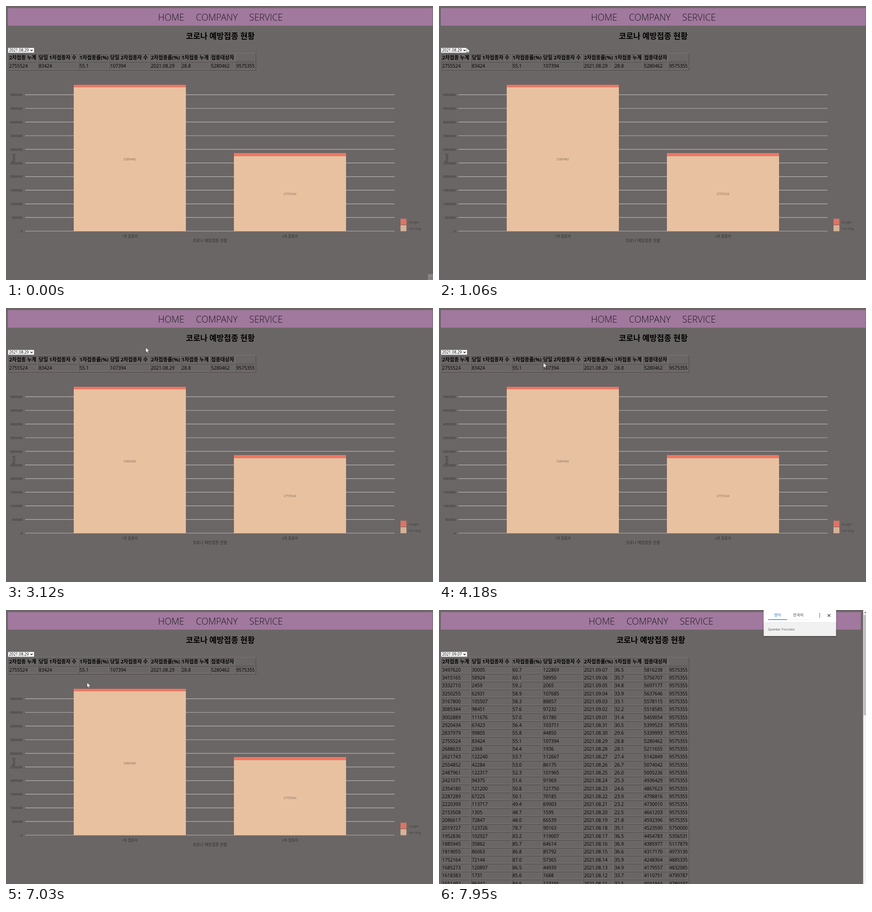
An HTML page that plays this animation: 933 px wide and 600 px high, repeating every 8 s.

```html
<!DOCTYPE html>
<html lang="ko">
<head>
<meta charset="utf-8">
<title>코로나 예방접종 현황</title>
<style>
html, body { margin: 0; width: 100%; height: 100%; overflow: hidden; background: #6b6666; }
svg { display: block; width: 933px; height: 600px; font-family: "Open Sans", "Noto Sans CJK KR", sans-serif; }
.nav { font-weight: 300; }
.flip { visibility: hidden; animation: 8s step-end infinite; }
#status { animation-name: status; }
#chartPage { animation-name: chartPage; }
#listPage { animation-name: listPage; }
#beam { animation-name: beam; }
#popup { opacity: 0; animation: popup 8s linear infinite; }
#arrow { animation: arrow 8s ease-in-out infinite; }
@keyframes status { 0% { visibility: visible } .875%, 100% { visibility: hidden } }
@keyframes chartPage { 0% { visibility: visible } 92%, 100% { visibility: hidden } }
@keyframes listPage { 0% { visibility: hidden } 92%, 100% { visibility: visible } }
@keyframes beam { 0% { visibility: hidden } 94.5%, 100% { visibility: visible } }
@keyframes popup { 0%, 93.6% { opacity: 0 } 96%, 100% { opacity: 1 } }
@keyframes arrow {
  0%, 4.99% { transform: translate(950px, 620px) }
  5% { transform: translate(867px, 590px); animation-timing-function: ease-out }
  13.25% { transform: translate(60.5px, 91.5px) }
  16.5%, 22.3% { transform: translate(42px, 95px) }
  27.4% { transform: translate(103px, 9px) }
  32.4%, 33% { transform: translate(317px, 52px) }
  42.4%, 43.2% { transform: translate(301px, 99px) }
  46.5%, 48.2% { transform: translate(301px, 105px); animation-timing-function: ease-out }
  52.2% { transform: translate(228px, 119.5px) }
  54.75%, 57.2% { transform: translate(226px, 124.5px) }
  62.25%, 73.8% { transform: translate(185px, 161px) }
  81.25%, 86.1% { transform: translate(179px, 159px) }
  87.9%, 94.49% { transform: translate(177px, 158.5px) }
  94.5%, 100% { transform: translate(950px, 620px) }
}
</style>
</head>
<body>
<svg id="stage" viewBox="0 0 933 600">
  <defs>
    <filter id="shadow" x="-10%" y="-10%" width="120%" height="130%">
      <feDropShadow dx="0" dy="1" stdDeviation="1.5" flood-opacity=".45"/>
    </filter>
  </defs>
  <g id="chartPage" class="flip"></g>
  <g id="listPage" class="flip"></g>
  <g id="status" class="flip"></g>
  <g id="popup"></g>
  <g id="beam" class="flip">
    <path d="M174.8 155h4M176.8 155v10M174.8 165h4" fill="none" stroke="#938e8e" stroke-width=".7"/>
  </g>
  <path id="arrow" d="M0 0V11.3L2.6 8.9L4.2 12.6L6 11.9L4.4 8.2H8Z" fill="#fff" stroke="#111" stroke-width=".6"/>
</svg>
<script>
const SVG = 'http://www.w3.org/2000/svg';
const INK = '#353131';
const PITCH = 52 / 3;
const middle = { 'text-anchor': 'middle' };
const byId = id => document.getElementById(id);

function add(parent, tag, attrs, content) {
  const node = document.createElementNS(SVG, tag);
  for (const key in attrs) node.setAttribute(key, attrs[key]);
  if (content !== undefined) node.textContent = content;
  parent.appendChild(node);
  return node;
}
const rect = (g, x, y, width, height, fill, more) => add(g, 'rect', { x, y, width, height, fill, ...more });
const path = (g, d, stroke, width) => add(g, 'path', { d, fill: 'none', stroke, 'stroke-width': width });
const text = (g, x, y, size, content, more) => add(g, 'text', { x, y, 'font-size': size, ...more }, content);

function bevel(g, x, y, w, h, topLeft, bottomRight) {
  path(g, `M${x} ${y + h}V${y}H${x + w}`, topLeft, .75);
  path(g, `M${x} ${y + h}H${x + w}V${y}`, bottomRight, .75);
}

function header(g, right, date) {
  const mid = (4 + right) / 2;
  rect(g, 4, 4.6, right - 4, 38.4, '#a1789e');
  [['HOME', -107.3], ['COMPANY', -7.5], ['SERVICE', 100]].forEach(([word, dx]) =>
    text(g, mid + dx, 32, 19.8, word, { ...middle, class: 'nav', fill: '#1c1a1c' }));
  text(g, mid, 72.3, 17.1, '코로나 예방접종 현황', { ...middle, 'font-weight': 700 });
  rect(g, 4.3, 91.7, 57.2, 10.8, '#fff', { stroke: '#777', 'stroke-width': .7 });
  text(g, 6.8, 100.2, 8.45, date);
  path(g, 'M53.6 95.8l2.3 2.4 2.3-2.4', '#111', 1.3);
}

const columns = [7.3, 72, 161, 228, 317, 384, 448.5, 503.5, 546.7];
const titles = ['2차접종 누계', '당일 1차접종자 수', '1차접종률(%)', '당일 2차접종자 수', '2차접종률(%)', '1차접종 누계', '접종대상자'];

function table(g, rows) {
  bevel(g, 4.4, 103.6, 541.6, (rows.length + 1) * PITCH + 2.4, '#837e7e', '#453f3f');
  [titles, ...rows].forEach((cells, r) => {
    const y = 105.5 + r * PITCH;
    cells.forEach((cell, c) => {
      const x = columns[c] - 1.2;
      bevel(g, x, y, columns[c + 1] - columns[c] - 1.9, 15.7, '#453f3f', '#837e7e');
      text(g, columns[c] - .3, y + 11.9, r ? 10.1 : 10.9, cell, { 'font-weight': r ? 400 : 700 });
    });
  });
}

const DAYS = 28;
const picked = { day: 9, first: 83424, second: 107394 };
const mix = (a, b, t) => Math.round(a + (b - a) * t);

// Running total through its newest, picked and oldest values
const total = (day, newest, chosen, oldest) => day < picked.day
  ? mix(newest, chosen, day / picked.day)
  : mix(chosen, oldest, (day - picked.day) / (DAYS - 1 - picked.day));

let seed = 7;
const random = () => (seed = seed * 16807 % 2147483647) / 2147483647;
const shots = (day, low, high) => day % 8 === 2 ? mix(1000, 3000, random()) : mix(low, high, random());

function record(day) {
  const people = day < 20 ? 9575355 : Math.round(4.75e6 + 1e6 * Math.exp((20 - day) / 2));
  const first = total(day, 5816238, 5280462, 4041944);
  const second = total(day, 3497620, 2755524, 1551492);
  const today = day === picked.day ? picked
    : { first: shots(day, 30000, 130000), second: shots(day, 40000, 130000) };
  const percent = n => (100 * n / people).toFixed(1);
  const date = new Date(Date.UTC(2021, 8, 7 - day)).toISOString().slice(0, 10).replaceAll('-', '.');
  return [second, today.first, percent(first), today.second, date, percent(second), first, people];
}
const rows = Array.from({ length: DAYS }, (_, day) => record(day));

function chart(g, row) {
  const base = 493;
  const scale = n => n * 298.6 / 5e6;
  for (let n = 0; n <= 5e6; n += 5e5) {
    const y = base - scale(n);
    path(g, `M42 ${y}H849`, '#b9b6b6', 1.2);
    text(g, 36.3, y + 2.8, 6.9, n, { 'text-anchor': 'end', fill: INK });
  }
  [[148, row[6], row[1], '1차 접종자'], [498, row[0], row[3], '2차 접종자']].forEach(([x, sum, today, label]) => {
    const h = scale(sum), top = scale(today);
    rect(g, x, base - h, 245, h, '#e8c1a0');
    rect(g, x, base - h - top, 245, top, '#f47560');
    text(g, x + 122.5, base - h / 2 + 2.8, 6.9, sum, { ...middle, fill: '#836d5a' });
    text(g, x + 122.5, 507.3, 7.8, label, { ...middle, fill: INK });
  });
  text(g, 445.5, 516.5, 8.6, '코로나 예방접종 현황', { ...middle, fill: INK });
  text(g, 0, 0, 8.3, 'food', { ...middle, fill: INK, transform: 'translate(20 333) rotate(-90)' });
  [['burger', '#df7361', 465.8], ['hot dog', '#d5b397', 480]].forEach(([name, color, y]) => {
    rect(g, 862, y, 12.9, 13.2, color);
    text(g, 880, y + 9.8, 7.3, name, { fill: '#454040' });
  });
}

const first = byId('chartPage');
header(first, 932.3, '2021.08.29');
table(first, [rows[picked.day]]);
chart(first, rows[picked.day]);

const list = byId('listPage');
header(list, 921.7, '2021.09.07');
table(list, rows);
rect(list, 926.8, 0, 6.2, 600, '#f4f3f3');
rect(list, 927.8, 10.5, 5.2, 220, '#c1c0c0');
add(list, 'path', { d: 'M929 6.5l2.4-2.6 2.4 2.6z', fill: '#555' });

const status = byId('status');
rect(status, 922, 587.3, 11, 13, '#8b8787');
text(status, 926, 598, 5.5, 'No', { fill: '#555' });

const popup = byId('popup');
rect(popup, 709.5, -4, 158, 61, '#f1f1f1', { rx: 1.5, filter: 'url(#shadow)' });
rect(popup, 709.5, -4, 158, 31, '#fff');
path(popup, 'M709.5 27H867.5', '#dedede', .6);
path(popup, 'M760 21.3H809', '#e2e2e2', .7);
path(popup, 'M719 21H760.5', '#3b78d8', 1.4);
text(popup, 739.7, 14, 8.3, '영어', { ...middle, fill: '#3b78d8' });
text(popup, 785, 14, 8.3, '한국어', { ...middle, fill: '#444' });
[8.3, 11.8, 15.3].forEach(cy => add(popup, 'circle', { cx: 831.7, cy, r: 1, fill: '#444' }));
path(popup, 'M849.2 8.8l6 6m0-6l-6 6', '#333', 1.2);
const brand = text(popup, 719, 44.8, 7, '', { fill: '#666' });
add(brand, 'tspan', { fill: '#444', 'font-weight': 500 }, 'Quimbo');
add(brand, 'tspan', {}, ' Translate');
</script>
</body>
</html>
```
